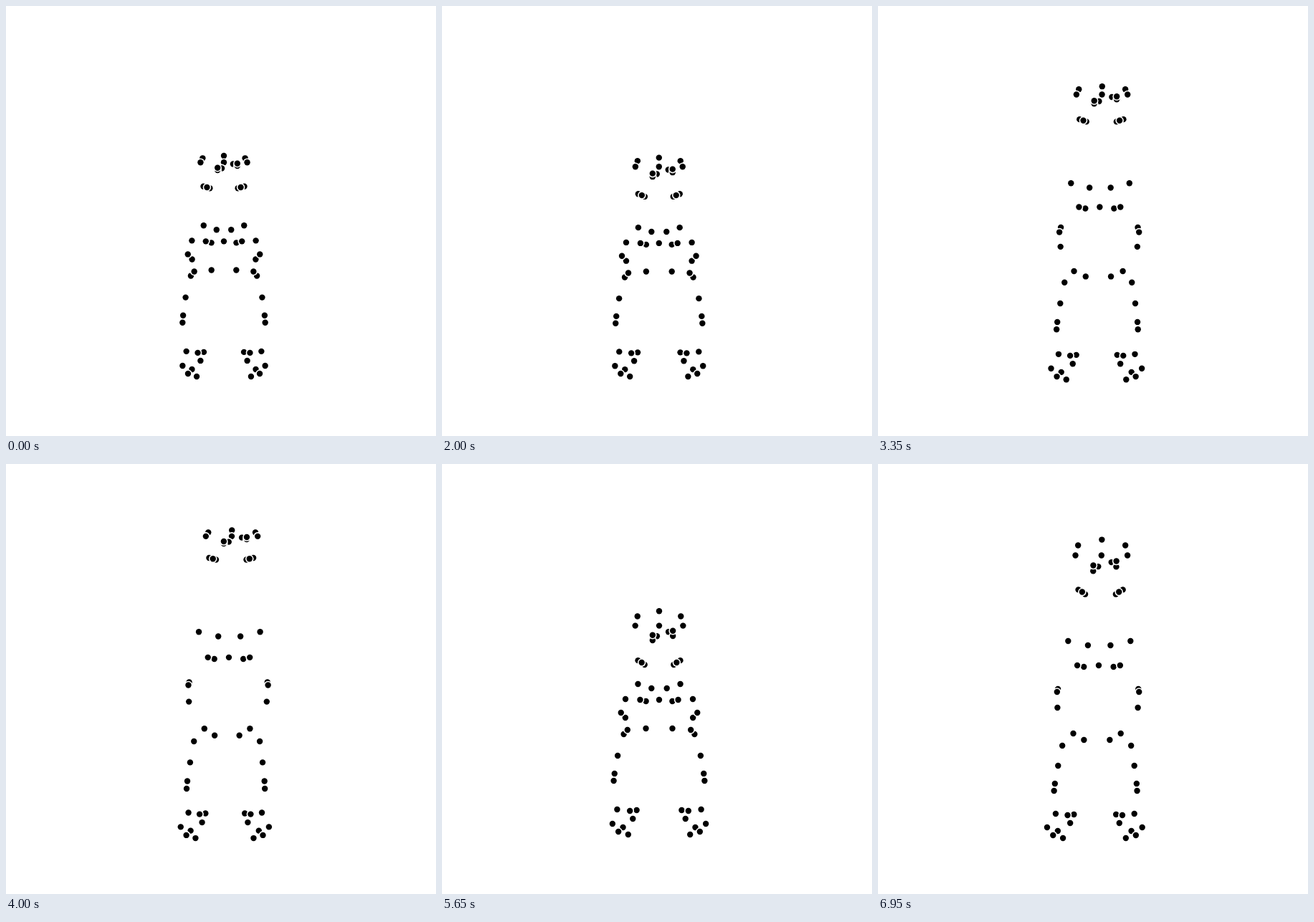
Recreate the animation shown at these times as an HTML page with a canvas. Size 600 by 600 pixels, loop 7000 ms.

```html
<!DOCTYPE html>
<html>
<head>
<meta charset="utf-8">
<style>
html, body { margin: 0; width: 100%; height: 100%; overflow: hidden; background: #fff; }
canvas { display: block; }
</style>
</head>
<body>
<canvas id="stage" width="600" height="600"></canvas>
<script>
const LOOP = 7000, STEP = 50, AXIS = 302, FLOOR = 520;
const ctx = document.getElementById('stage').getContext('2d');

// Half a crouched body as [distance from the axis, y]; the other half mirrors it.
// On standing up, a part moves by `lift` and its distances scale by `widen`.
// Nodding stretches a part about `pivot`; `turn` and `tilt` skew the face.
const body = [
  { dots: [[30, 213], [0, 208], [33, 222], [0, 222]], lift: -99, widen: 1.1, pivot: 214 },
  { dots: [[8, 230], [14, 234], [14, 229]], lift: -99, widen: 1.15, pivot: 214, turn: 5, tilt: 3 },
  { dots: [[29, 262], [20, 266], [24, 264]], lift: -102, widen: 1.07, pivot: 235 },
  { dots: [[29, 307], [10.5, 313]], lift: -60, widen: 1.5 },
  { dots: [[18, 331], [0, 329], [26, 329]], lift: -48, widen: 1.15 },
  { dots: [[46, 354], [46, 328]], lift: -14, widen: 1.22 },
  { dots: [[52, 347]], lift: -29, widen: 1.1 },
  { dots: [[48, 377], [18, 369]], lift: 16, widen: 1 },
  { dots: [[43, 371]], lift: 5, widen: .77 },
  { dots: [[56, 407], [60, 432], [61, 442]], lift: 14, widen: .95 },
  { dots: [[56, 482], [39, 485], [30, 483], [39, 484], [35, 495]], lift: 6, widen: .98 },
  { dots: [[62, 502], [48, 507], [54, 513], [41, 517]], lift: 5, widen: 1.07 }
];

// Small movements of the whole body at a few moments.
const moments = [0, 1200, 2750, 3700, 4000, 4900, 5650, 6450, 6950];
const sway = [2, 0, 1.5, 3, 3, -3, 1, 2, 0];
const bob = [-1, 3, 3, -17, -14, -6, 0, -18, 0];
const nod = [-.35, -.4, .2, -.4, -.43, 0, .45, -.4, .57];
const stance = [-.07, -.02, 0, -.05, -.07, .01, .05, -.03, 0];

const mix = (a, b, k) => a + (b - a) * k;
const smooth = k => k * k * (3 - 2 * k);
const progress = (t, from, to) => Math.min(1, Math.max(0, (t - from) / (to - from)));
const spring = (t, from, to) => Math.sin(progress(t, from, to) * Math.PI / 2);

// 0 crouched, 1 standing: up, down, and up again.
const rise = t => spring(t, 2750, 3700) - smooth(progress(t, 4000, 4750)) + spring(t, 5650, 6400);

function track(values, t) {
  let i = 0;
  while (i < moments.length - 2 && t >= moments[i + 1]) i++;
  return mix(values[i], values[i + 1], smooth(progress(t, moments[i], moments[i + 1])));
}

function disc(x, y, r, color) {
  ctx.fillStyle = color;
  ctx.beginPath();
  ctx.arc(x, y, r, 0, 2 * Math.PI);
  ctx.fill();
}

function draw(t) {
  const up = rise(t);
  const [shift, hop, bow, spread] = [sway, bob, nod, stance].map(v => track(v, t));
  ctx.fillStyle = '#fff';
  ctx.fillRect(0, 0, 600, 600);
  for (const { dots, lift, widen, pivot, turn = 0, tilt = 0 } of body) {
    for (const [reach, rest] of dots) {
      let y = rest + lift * up;
      if (pivot) y += bow * (rest - pivot);
      const height = FLOOR - y;
      const half = reach * mix(1, widen, up) * (1 + spread * (y / 500) ** 2);
      const middle = AXIS + shift + turn + up * height / 40;
      y += hop * height / 300;
      for (const side of reach ? [-1, 1] : [0]) {
        disc(middle + side * half, y - side * tilt, 5.8, '#fff');
        disc(middle + side * half, y - side * tilt, 4.2, '#000');
      }
    }
  }
}

const start = performance.now();
function tick() {
  const t = (performance.now() - start) % LOOP;
  draw(Math.floor(t / STEP) * STEP);
  requestAnimationFrame(tick);
}
tick();
</script>
</body>
</html>
```
